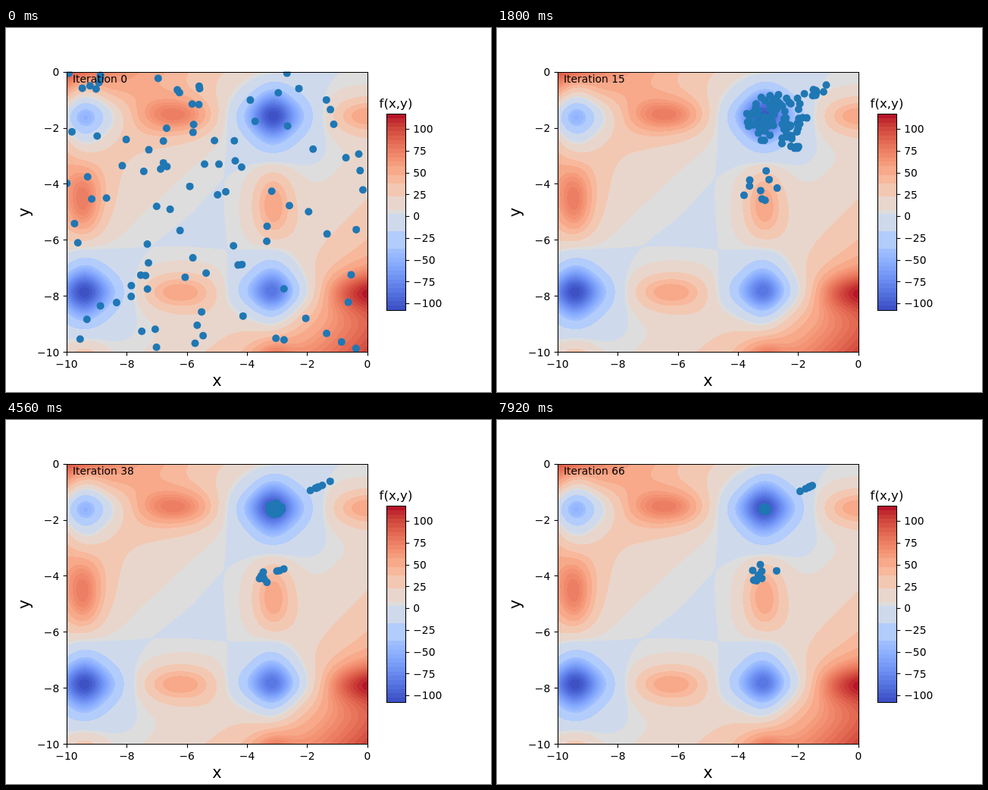
Animation of 640 by 480 pixels, one loop 8000 ms. Source, as an HTML page with a canvas:

```html
<!DOCTYPE html>
<html lang="en">
<head>
<meta charset="utf-8">
<title>Swarm search</title>
<style>
  html, body { margin: 0; width: 100%; height: 100%; overflow: hidden; background: #fff; }
  canvas, svg { position: absolute; left: 0; top: 0; width: 640px; height: 480px; }
  text { font: 13.89px "DejaVu Sans", sans-serif; fill: #000; }
  .mid { text-anchor: middle; }
  .end { text-anchor: end; }
  .axis { font-size: 20.83px; }
  .title { font-size: 16.67px; }
  .line { fill: none; stroke: #000; stroke-width: 1.11; }
  #dots { fill: #1f77b4; }
</style>
</head>
<body>
<canvas id="field" width="640" height="480"></canvas>
<svg viewBox="0 0 640 480">
  <clipPath id="box"><rect x="80" y="57.6" width="396.8" height="369.6"/></clipPath>
  <g id="dots" clip-path="url(#box)"></g>
  <g id="axes"></g>
  <text id="label" x="88" y="72.4"></text>
</svg>
<script>
const STEP = 120, LOOP = 8000;
const LEFT = 80, TOP = 57.6, W = 396.8, H = 369.6;
const BAR = { y: 113.05, h: 258.7, min: -107.5, max: 117.5 };
const $ = id => document.getElementById(id);
const mix = (a, b, u) => a + (b - a) * u;

// Height field and its filled contours: fine bands at both ends, broad ones between
const fives = (from, to) => Array.from({ length: (to - from) / 5 + 1 }, (_, i) => from + 5 * i);
const edges = [...fives(BAR.min, -37.5), -17.5, 2.5, 7.5, 22.5, 37.5, 47.5, ...fives(57.5, BAR.max)];

function height(x, y) {
  const s = Math.sin(y), c = Math.cos(x);
  return s * Math.exp((1 - c) ** 2) + c * Math.exp((1 - s) ** 2) + (x - y) ** 2;
}

// Diverging blue-grey-red scale, interpolated in polar Lab space
function rampColor(v) {
  const t = (v - BAR.min) / (BAR.max - BAR.min), s = Math.abs(2 * t - 1);
  const m = mix(88, 80, s), sat = 1.08 * s;
  const hue = t < .5 ? mix(-1.661, -1.1, s) : mix(1.061, .5, s);
  const a = m * Math.sin(sat) * Math.cos(hue), b = m * Math.sin(sat) * Math.sin(hue);
  const f = (m * Math.cos(sat) + 16) / 116;
  const cube = q => q > 6 / 29 ? q ** 3 : (q - 16 / 116) / 7.787;
  const x = .9505 * cube(f + a / 500), y = cube(f), z = 1.089 * cube(f - b / 200);
  const gamma = q => 255 * (q > .0031308 ? 1.055 * q ** (1 / 2.4) - .055 : 12.92 * q);
  return [
    3.2406 * x - 1.5372 * y - .4986 * z,
    -.9689 * x + 1.8758 * y + .0415 * z,
    .0557 * x - .204 * y + 1.057 * z
  ].map(gamma);
}

const bands = edges.slice(1).map((e, i) => rampColor((e + edges[i]) / 2));

function bandOf(v) {
  let i = 0;
  while (i < bands.length - 1 && v >= edges[i + 1]) i++;
  return bands[i];
}

function paintField() {
  const ctx = $('field').getContext('2d');
  const img = ctx.createImageData(640, 480);
  const put = (x, y, rgb) => img.data.set([...rgb, 255], (y * 640 + x) * 4);
  for (let y = 58; y < 428; y++)
    for (let x = 80; x < 477; x++)
      put(x, y, bandOf(height((x + .5 - LEFT) / W * 10 - 10, -(y + .5 - TOP) / H * 10)));
  for (let y = 113; y < 372; y++) {
    const rgb = bandOf(BAR.max - (y + .5 - BAR.y) / BAR.h * (BAR.max - BAR.min));
    for (let x = 502; x < 528; x++) put(x, y, rgb);
  }
  ctx.putImageData(img, 0, 0);
}

function drawAxes() {
  const snap = v => Math.floor(v + .5) + .5;
  const text = (x, y, s, cls, extra = '') => `<text x="${x}" y="${y}" class="${cls}" ${extra}>${s}</text>`;
  const line = d => `<path class="line" d="${d}"/>`;
  const sign = v => String(v).replace('-', '\u2212');
  let out = line('M80.5 58.5H477.5V427.5H80.5Z') + line('M502.5 113.5H527.5V372.5H502.5Z');
  for (let v = -10; v <= 0; v += 2) {
    const x = LEFT + (v + 10) / 10 * W, y = TOP - v / 10 * H;
    out += line(`M${snap(x)} 427.5v4.86`) + text(x, 447.6, sign(v), 'mid');
    out += line(`M80.5 ${snap(y)}h-4.86`) + text(70.3, y + 5.3, sign(v), 'end');
  }
  for (let v = -100; v <= 100; v += 25) {
    const y = BAR.y + (BAR.max - v) / (BAR.max - BAR.min) * BAR.h;
    out += line(`M527.5 ${snap(y)}h4.86`) + text(537.2, y + 5.3, sign(v), '');
  }
  out += text(278.4, 471.7, 'x', 'mid axis');
  out += text(0, 0, 'y', 'mid axis', 'transform="translate(31 243) rotate(-90)"');
  out += text(514.5, 104.7, 'f(x,y)', 'mid title');
  $('axes').innerHTML = out;
}

// Seeded noise in 0..1
function hash(a, b) {
  let h = Math.imul(a + 1, 374761393) ^ Math.imul(b + 7, 668265263);
  h = Math.imul(h ^ h >>> 13, 1274126177);
  h = Math.imul(h ^ h >>> 16, 0x85ebca6b);
  return ((h ^ h >>> 15) >>> 0) / 4294967296;
}
const noise = (a, b) => 2 * hash(a, b) - 1;

// The dots fly in until GATHERED, then each group tightens at its own rate
const COUNT = 100, GATHERED = 7;
const decay = (k, rate) => Math.exp((GATHERED - k) / rate);

// A dot's fixed place in its cloud, plus a small hop in every iteration
function inCloud(i, k, cx, cy, spread, hop) {
  const angle = hash(i, 4) * 2 * Math.PI, r = 1.8 * hash(i, 5) ** .6;
  return [
    cx + spread * (r * Math.cos(angle) + hop * noise(i, 100 + k)),
    cy + spread * .75 * (r * Math.sin(angle) + hop * noise(i, 300 + k))
  ];
}

function onRidge(i, k) {
  const e = decay(k, 8), u = noise(i, 6) + .3 * noise(i, 100 + k);
  const x = 412 + 25 * e + (18 + 8 * e) * u * Math.abs(u);
  return [x, 96 - .47 * (x - 396) + 14 * e * noise(i, 7)];
}

function onHill(i, k) {
  const e = decay(k, 8);
  return inCloud(i, k, 343, 208 + 17 * e, 14 + 16 * e, .5);
}

function straggling(i, k) {
  const e = decay(k, 9);
  return inCloud(i, k, 353 + 84 * e, 118 + 80 * e, 2 + 13 * e, .3);
}

function inWell(i, k) {
  const spread = 1.5 + 40 * decay(k, 13);
  return inCloud(i, k, 352 + spread / 2, 117.5, spread, .25);
}

function goal(i, k) {
  if (i < 8) return onRidge(i, k);
  if (i < 17) return onHill(i, k);
  if (i < 26) return straggling(i, k);
  return inWell(i, k);
}

function position(i, k) {
  const start = [LEFT + W * hash(i, 1), TOP + H * hash(i, 2)];
  const u = Math.min(1, k / GATHERED), ease = 1 - (1 - u) ** 2;
  return goal(i, Math.max(k, GATHERED)).map((g, n) => mix(start[n], g, ease));
}

paintField();
drawAxes();
$('dots').innerHTML = '<circle r="5"/>'.repeat(COUNT);
const circles = [...$('dots').children];

let shown = -1;
function show(k) {
  if (k === shown) return;
  shown = k;
  $('label').textContent = 'Iteration ' + k;
  circles.forEach((circle, i) => {
    const [x, y] = position(i, k);
    circle.setAttribute('cx', x.toFixed(1));
    circle.setAttribute('cy', y.toFixed(1));
  });
}

const begin = performance.now();
function tick() {
  show(Math.floor((performance.now() - begin) % LOOP / STEP));
  requestAnimationFrame(tick);
}
tick();
</script>
</body>
</html>
```
